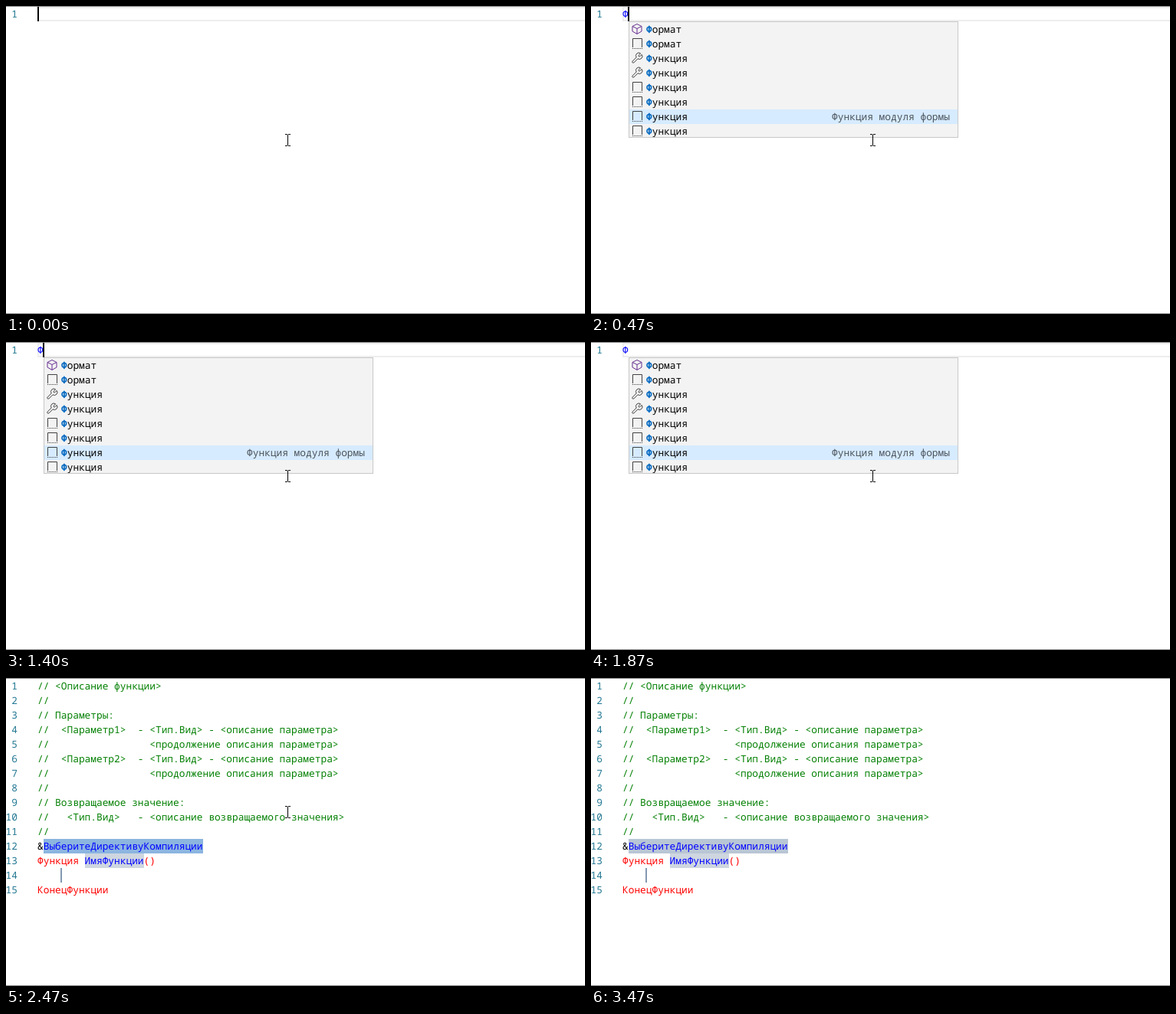
Write an HTML page that moves like this. It is 755 px wide and 402 px high and loops after 3590 ms.

```html
<!DOCTYPE html>
<html lang="ru">
<head>
<meta charset="utf-8">
<title>Автодополнение</title>
<style>
  html, body { margin: 0; width: 100%; height: 100%; overflow: hidden; background: #fff; }
  #stage { display: block; }
  text { font: 12.83px "Noto Sans Mono", "DejaVu Sans Mono", monospace; white-space: pre; text-rendering: geometricPrecision; }
  rect { shape-rendering: crispEdges; }
  .num { fill: #237893; text-anchor: end; }
  .comment { fill: #007f00; }
  .key { fill: #f00; }
  .name { fill: #00f; }
  .match { fill: #0066bf; font-weight: bold; }
</style>
</head>
<body>
<svg id="stage" width="755" height="402" viewBox="0 0 755 402">
  <defs>
    <g id="cube" fill="none" stroke="#652d90" stroke-linejoin="round">
      <path d="M8 1.5L14 4.5V11L8 14.5L2 11V4.5ZM2 4.5L8 7.5L14 4.5M8 7.5V14.5"/>
    </g>
    <g id="snippet" fill="none" stroke="#424242">
      <path d="M2.5 13V1.5H14.5V13"/>
      <path d="M2 14.5H15" stroke-dasharray="1"/>
    </g>
    <g id="wrench" fill="none" stroke="#424242" stroke-linejoin="round">
      <path d="M2 12.2L7.2 7A3.8 3.8 0 0 1 12.6 1.8L10.2 4.3V5.8H11.7L14.2 3.4A3.8 3.8 0 0 1 9 8.8L3.8 14A1.3 1.3 0 0 1 2 12.2Z"/>
    </g>
  </defs>

  <g id="typing">
    <path d="M41 2H755M41 19H755M42 1V20" stroke="#eee" stroke-width="2"/>
    <text class="num" x="15" y="15">1</text>
    <text id="letter" class="name" x="41" y="15">Ф</text>
    <svg id="popup" x="49" y="20" width="430" height="152">
      <rect width="430" height="152" fill="#f3f3f3"/>
      <rect x="1" y="115" width="428" height="19" fill="#d6ebff"/>
      <g id="items"></g>
      <text x="265" y="129" fill="#000" fill-opacity=".65">Функция модуля формы</text>
      <rect x=".5" y=".5" width="429" height="151" fill="none" stroke="#c8c8c8"/>
    </svg>
  </g>

  <g id="result">
    <rect id="selection" x="49" y="210" width="208" height="19"/>
    <rect x="103" y="229" width="77" height="19" fill="#ced6e0"/>
    <rect x="71" y="248" width="2" height="19" fill="#8498b1"/>
    <g id="code"></g>
  </g>

  <rect id="caret" width="2" height="19"/>
  <path d="M0 .5H755M0 401.5H755" stroke="#858585"/>
  <path id="pointer" d="M-3.5 -7.5H-.5M.5 -7.5H3.5M0 -7V7M-3.5 7.5H-.5M.5 7.5H3.5" stroke="#000"/>
</svg>
<script>
const LOOP = 3590, LINE = 19;
const $ = id => document.getElementById(id);
const span = (cls, text) => `<tspan class="${cls}">${text.replace(/&/g, "&amp;").replace(/</g, "&lt;")}</tspan>`;

const comments = [
  "// <Описание функции>",
  "//",
  "// Параметры:",
  "//  <Параметр1>  - <Тип.Вид> - <описание параметра>",
  "//                 <продолжение описания параметра>",
  "//  <Параметр2>  - <Тип.Вид> - <описание параметра>",
  "//                 <продолжение описания параметра>",
  "//",
  "// Возвращаемое значение:",
  "//   <Тип.Вид>   - <описание возвращаемого значения>",
  "//"
];
const lines = [
  ...comments.map(text => span("comment", text)),
  span("", "&") + span("name", "ВыберитеДирективуКомпиляции"),
  span("key", "Функция ") + span("name", "ИмяФункции") + span("key", "()"),
  "",
  span("key", "КонецФункции")
];
$("code").innerHTML = lines.map((line, i) => {
  const y = 15 + i * LINE;
  return `<text class="num" x="15" y="${y}">${i + 1}</text><text x="41" y="${y}">${line}</text>`;
}).join("");

const icons = ["cube", "snippet", "wrench", "wrench", "snippet", "snippet", "snippet", "snippet"];
$("items").innerHTML = icons.map((icon, i) => {
  const y = 1 + i * LINE;
  return `<use href="#${icon}" x="3" y="${y + 1}"/>
    <text x="23" y="${y + 14}">${span("match", "Ф")}${i < 2 ? "ормат" : "ункция"}</text>`;
}).join("");

const show = (id, on) => { $(id).style.display = on ? "" : "none"; };
const within = (t, from, to) => t >= from && t < to;

function draw(t) {
  const typed = t >= 400, done = t >= 1930;
  show("typing", !done);
  show("letter", typed);
  show("popup", t >= 470);
  show("result", done);
  $("selection").setAttribute("fill", t < 3470 ? "#8cb5e0" : "#b9c6d5");

  show("caret", ![[870, 1400], [1870, 1930], [2470, 3000], [3470, LOOP]].some(([a, b]) => within(t, a, b)));
  $("caret").setAttribute("x", done ? 256 : typed ? 48 : 41);
  $("caret").setAttribute("y", done ? 210 : 1);

  // The pointer leaves through the bottom edge in four jumps.
  const step = t < 2800 ? 0 : Math.min(4, 1 + Math.floor((t - 2800) / 66));
  const p = (step / 4) ** 1.5;
  const x = Math.round(367 - 268 * p) + 0.5, y = Math.round(175 + 219 * p);
  $("pointer").setAttribute("transform", `translate(${x} ${y})`);
  show("pointer", t < 3130);
}

const start = performance.now();
function tick() {
  draw((performance.now() - start) % LOOP);
  requestAnimationFrame(tick);
}
tick();
</script>
</body>
</html>
```
